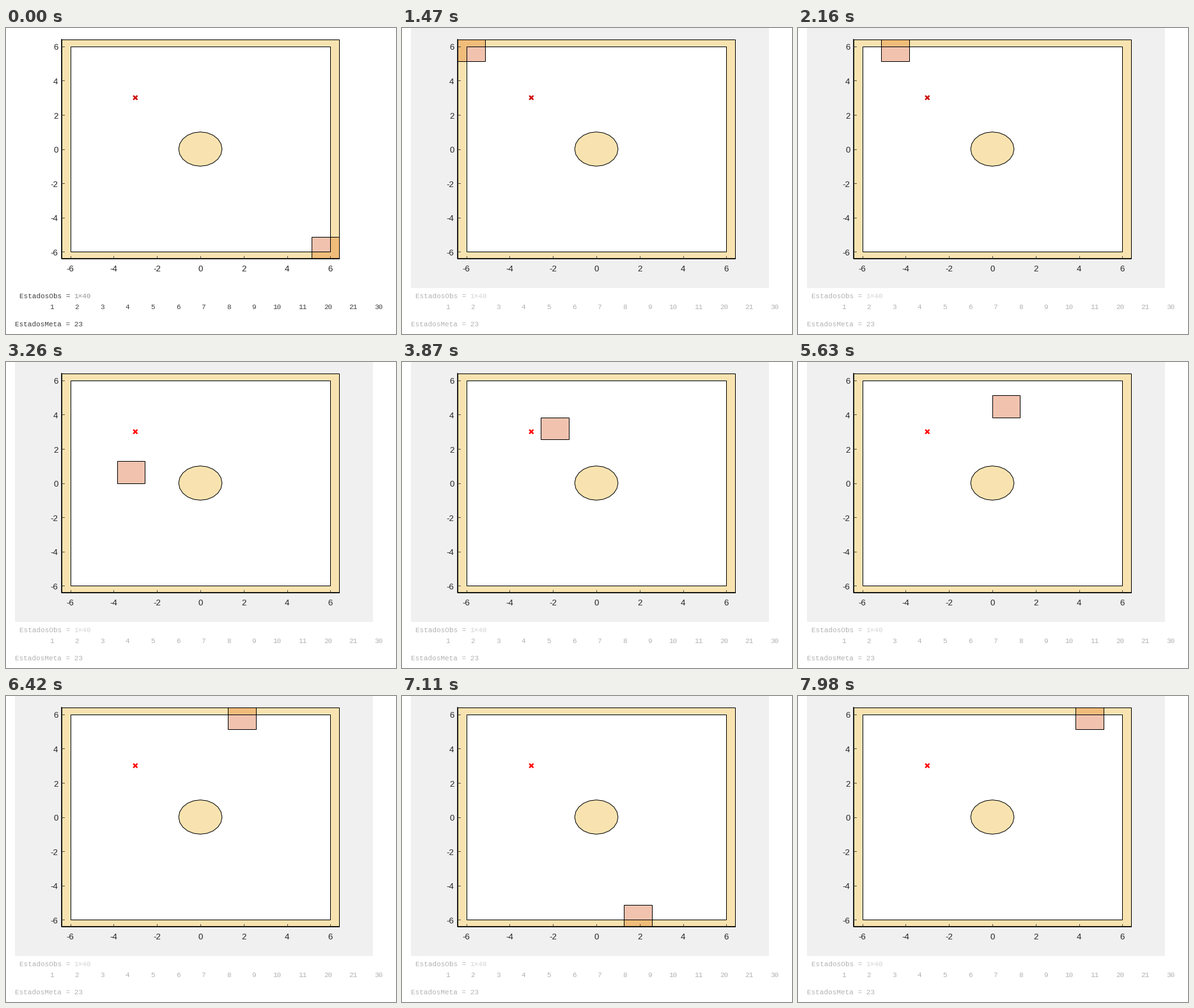
Write a matplotlib script that moves like this. It is 610x479 px and loops after 8000 ms.

```python
import numpy as np
import matplotlib.pyplot as plt
from matplotlib.animation import FuncAnimation
from matplotlib.patches import PathPatch, Polygon, Rectangle
from matplotlib.path import Path

W, H, DPI = 610, 479, 100
PX = 72 / DPI  # points per pixel
INTERVAL, LOOP = 20, 8000
GRID, GOAL = 10, 22

SAND, PINK, ORANGE = "#f8e3b0", "#f1c3af", "#f0bc7a"
INK, DIM_INK, NOTE, DIM_NOTE = "#404040", "#b3b3b3", "#b3b3b3", "#e0e0e0"

# (state, time in ms) anchors; steps in between are evenly spaced
ANCHORS = np.array([
    (0, 1420), (10, 2160), (11, 2260), (21, 3000), (22, 3130), (24, 3260),
    (25, 3360), (32, 3870), (33, 3970), (34, 4330), (38, 4610), (39, 4710),
    (45, 5120), (46, 5220), (51, 5630), (52, 5710), (55, 5910), (56, 6040),
    (57, 6190), (67, 6980), (68, 7060), (69, 7110), (70, 7190), (78, 7800),
    (79, 7900), (80, 7980)])
STEP_TIMES = np.interp(np.arange(81), *ANCHORS.T).round(-1)


def sx(x):
    return 304 + 33.9 * x


def sy(y):
    return 189.5 - 26.8 * y


def box_points(half):
    corners = np.array([(-1, -1), (1, -1), (1, 1), (-1, 1), (-1, -1)]) * half
    return np.column_stack([sx(corners[:, 0]), sy(corners[:, 1])])


fig = plt.figure(figsize=(W / DPI, H / DPI), dpi=DPI, facecolor="white")
ax = fig.add_axes([0, 0, 1, 1])
ax.set(xlim=(0, W), ylim=(H, 0))
ax.axis("off")


def outline(points, width=1):
    ax.add_patch(Polygon(points, fill=False, ec="black", lw=width * PX,
                         joinstyle="miter", zorder=5))


def line(xs, ys, color="black", width=1, **kw):
    return ax.plot(xs, ys, color=color, lw=width * PX, **kw)[0]


def label(x, y, text, size=11, font="Liberation Mono", color=INK, **kw):
    return ax.text(x, y, text, fontsize=size * PX, family=font, color=color,
                   va="baseline", **kw)


panel = ax.add_patch(Rectangle((14, 0), 560, 406.5, fc="#f0f0f0", lw=0, zorder=0))

# Obstacles: outer wall and central disc
outer, inner = box_points(6.4), box_points(6)
angle = np.linspace(0, 2 * np.pi, 21)
disc = np.column_stack([sx(np.cos(angle)), sy(np.sin(angle))])
obstacles = Path.make_compound_path(
    Path(outer, closed=True), Path(inner[::-1], closed=True),
    Path(disc, closed=True))
ax.add_patch(Polygon(inner, fc="white", lw=0, zorder=1))
ax.add_patch(PathPatch(obstacles, fc=SAND, lw=0, zorder=1))

# Moving cell, tinted differently where it covers an obstacle
CELL_W, CELL_H = sx(1.28) - sx(0), sy(0) - sy(1.28)
cell, overlap, cell_edge = [
    ax.add_patch(Rectangle((0, 0), CELL_W, CELL_H, zorder=z, **style))
    for z, style in [(2, dict(fc=PINK, lw=0)), (3, dict(fc=ORANGE, lw=0)),
                     (6, dict(fill=False, ec="black", lw=PX))]]
overlap.set_clip_path(obstacles, ax.transData)

for shape in (outer, inner, disc):
    outline(shape)
left, right, top, bottom = sx(-6.4), sx(6.4), sy(6.4), sy(-6.4)
line([left, left, right], [top, bottom, bottom], width=1.5, zorder=5)

for v in range(-6, 7, 2):
    line([sx(v)] * 2, [bottom, bottom - 4], "#262626", 0.8, zorder=5)
    line([left, left + 4], [sy(v)] * 2, "#262626", 0.8, zorder=5)
    for x, y, align in [(sx(v), 380.7, "center"), (81.5, sy(v) + 5.7, "right")]:
        label(x, y, str(v), 13.3, "Liberation Sans", "#262626", ha=align)

gx, gy, r = sx(-3), sy(3), 3.2
cross = [line([gx - r, gx + r], [gy - s * r, gy + s * r], width=2.4,
              solid_capstyle="butt", zorder=7) for s in (-1, 1)]

texts = [label(21, 423, "EstadosObs ="), label(14, 467, "EstadosMeta = 23")]
observed = [*range(1, 12), 20, 21, 30]
texts += [label(74.5 + 39.6 * i, 440, str(n), ha="right")
          for i, n in enumerate(observed)]
note = label(106.5, 423, "1×40", weight="bold")


def update(frame):
    # sample at the middle of the frame's time slot
    t = frame * INTERVAL + INTERVAL / 2
    state = int(np.searchsorted(STEP_TIMES, t, side="right")) - 1
    running = state >= 0
    col, row = divmod(state % GRID ** 2, GRID)
    for patch in (cell, overlap, cell_edge):
        patch.set_xy((left + col * CELL_W, top + row * CELL_H))
    panel.set_visible(running)
    for text in texts:
        text.set_color(DIM_INK if running else INK)
    note.set_color(DIM_NOTE if running else NOTE)
    for stroke in cross:
        stroke.set_color("#ff0000" if state >= GOAL else "#cc0000")
    return []


anim = FuncAnimation(fig, update, frames=LOOP // INTERVAL, interval=INTERVAL,
                     init_func=lambda: update(0), repeat=True, repeat_delay=0)
plt.show()
```
